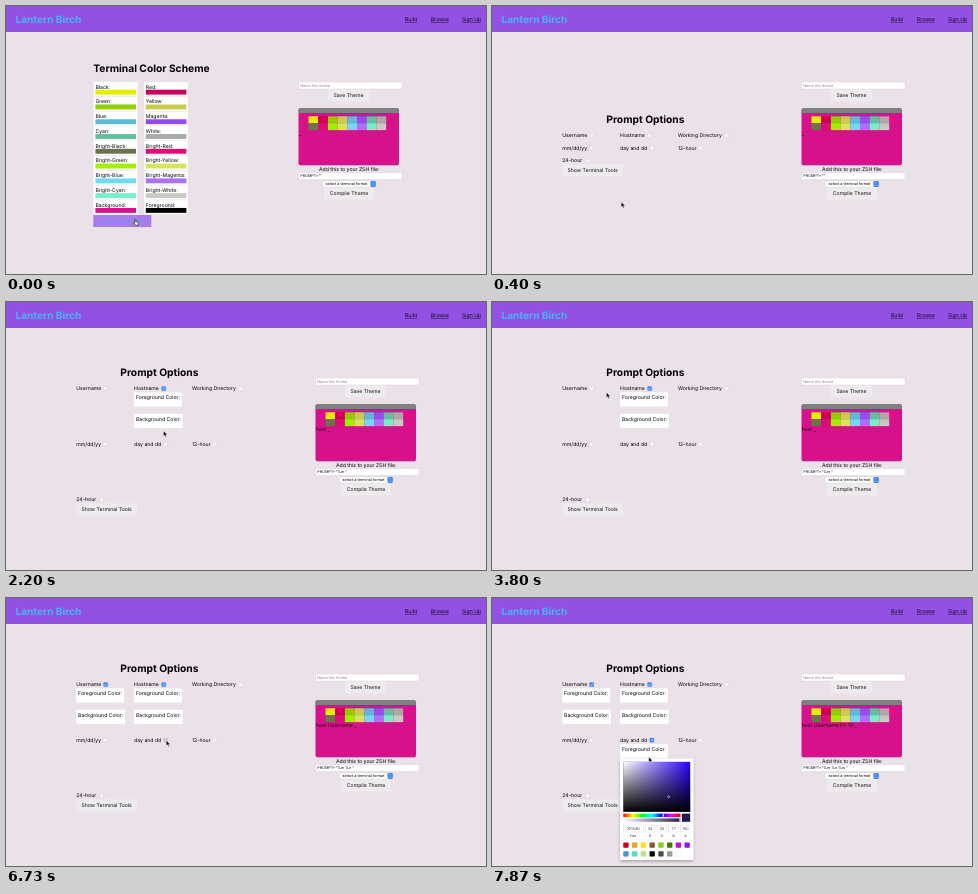
An HTML page for the animation above (8 s loop, 480x268 px).

```html
<!DOCTYPE html>
<html lang="en">
<head>
<meta charset="utf-8">
<title>Terminal theme builder</title>
<style>
html, body { margin: 0; width: 100%; height: 100%; overflow: hidden; background: #ebe1e9; }
svg { display: block; width: 100%; height: 100%; }
text { font-family: Inter, "Open Sans", sans-serif; white-space: pre; text-rendering: geometricPrecision; }
</style>
</head>
<body>
<svg viewBox="0 0 480 268">
  <defs>
    <linearGradient id="white"><stop stop-color="#fff"/><stop offset="1" stop-color="#fff" stop-opacity="0"/></linearGradient>
    <linearGradient id="black" x2="0" y2="1"><stop stop-opacity="0"/><stop offset="1"/></linearGradient>
    <linearGradient id="alpha"><stop stop-color="#22194d" stop-opacity="0"/><stop offset="1" stop-color="#22194d"/></linearGradient>
    <linearGradient id="hue">
      <stop stop-color="#f00"/><stop offset=".17" stop-color="#ff0"/><stop offset=".33" stop-color="#0f0"/>
      <stop offset=".5" stop-color="#0ff"/><stop offset=".67" stop-color="#00f"/><stop offset=".83" stop-color="#f0f"/>
      <stop offset="1" stop-color="#f00"/>
    </linearGradient>
    <filter id="shadow" x="-20%" y="-20%" width="140%" height="140%">
      <feDropShadow dx="0" dy="1.5" stdDeviation="1.8" flood-opacity=".28"/>
    </filter>
  </defs>
  <g id="page"></g>
  <g id="cursor">
    <path id="arrow" d="M0 0V5.2L1.2 4.1 2 6 2.9 5.6 2.1 3.8H3.7Z" fill="#000" stroke="#fff" stroke-width=".35"/>
    <path id="hand" d="M.9 .3Q1.5 -.1 1.8 .6V2.4L4.2 3.1V4.6L3.6 6.3H1.5L-.3 3.9Q0 3.2 .9 3.9Z" fill="#fff" stroke="#000" stroke-width=".55"/>
  </g>
</svg>
<script>
const LOOP = 8000, OPEN = 70, PICK = 7600, PRESS = 140;
const CLICKS = [2200, 5070, 6870];
const BODY = 5.15, SMALL = 3.75, TITLE = 10.25;
const $ = id => document.getElementById(id);

const NAMES = ['Black', 'Red', 'Green', 'Yellow', 'Blue', 'Magenta', 'Cyan', 'White'];
const COLORS = ['#e4f000', '#cb005c', '#8fce00', '#c9cb4e', '#5fb9d8', '#914cf2', '#62c0a2', '#a9a9a9',
  '#6f7052', '#dc0c74', '#a2f000', '#d6e65c', '#72d9f2', '#a873f8', '#74f0ca', '#c9cac4'];
const PINK = '#d6118a';
const PRESETS = ['#d0021b', '#f5a623', '#f8e71c', '#8b572a', '#7ed321', '#417505', '#bd10e0', '#9013fe',
  '#4a90e2', '#50e3c2', '#b8e986', '#000', '#4a4a4a', '#9b9b9b', '#fff'];

// cursor tip: time, x, y
const PATH = [[0, 128, 213], [70, 128, 213], [400, 129.3, 196], [870, 128, 160], [1670, 157.5, 129],
  [3130, 157.5, 129], [3800, 114.5, 90.5], [4000, 112, 90], [4270, 100, 86.7], [5330, 100, 86.7],
  [6130, 157.5, 144.5], [6400, 157.5, 144], [6730, 160.3, 142.5], [7130, 160.3, 142.5], [7400, 156.8, 159], [LOOP, 156.8, 159]];

const rect = (x, y, w, h, fill, more = '') =>
  `<rect x="${x}" y="${y}" width="${w}" height="${h}" fill="${fill}" ${more}/>`;

// text placed by the middle of its capitals
const text = (x, y, s, size = BODY, more = '') =>
  `<text x="${x}" y="${y + size * .36}" font-size="${size}" ${more}>${s}</text>`;
const mid = 'text-anchor="middle"';
const bold = 'font-weight="700"';

const button = (x, y, w, s, fill = '#eeebee', color = '#111') =>
  rect(x, y, w, 12, fill) + text(x + w / 2, y + 6, s, BODY, `${mid} fill="${color}"`);

const field = (x, y, s, color) =>
  rect(x, y, 103.5, 7, '#fff', 'stroke="#d5ccd4" stroke-width=".4"') + text(x + 1.8, y + 3.5, s, SMALL, `fill="${color}"`);

function header() {
  const links = [[399, 'Build'], [424.7, 'Browse'], [456, 'Sign Up']];
  return rect(0, 0, 480, 26, '#9351e3')
    + text(9.5, 13.3, 'Lantern Birch', 10.1, `${bold} fill="#49b2f5"`)
    + links.map(([x, s]) => text(x, 13, s, BODY, 'fill="#12081f" text-decoration="underline"')).join('');
}

function preview(dx, level) {
  const out = ['', 'host ', 'host Username ', 'host Username Fri 13 '][level];
  const code = ['', '%m ', '%m %n ', '%m %n %w '][level];
  const swatches = COLORS.map((c, i) =>
    rect(319.5 + i % 8 * 9.7, 110.3 + (i >> 3) * 6.9, 9.75, 6.95, c)).join('');
  return `<g transform="translate(${dx})">`
    + field(309.5, 76, 'Name this theme', '#8a858a')
    + button(339, 83.5, 41, 'Save Theme')
    + rect(309.5, 102, 100.5, 57.3, PINK, 'rx="2.6"')
    + '<path d="M309.5 107V104.6Q309.5 102 312.1 102H407.4Q410 102 410 104.6V107Z" fill="#808080"/>'
    + swatches
    + text(309.7, 127.3, out + '_', BODY, 'fill="#26041a"')
    + text(360.3, 162.8, 'Add this to your ZSH file:', BODY, mid)
    + field(309.5, 166.5, `PROMPT="${code}"`, '#111')
    + rect(333.2, 175, 53.6, 5.9, '#fff', 'rx="1.4" stroke="#cfc8cf" stroke-width=".3"')
    + text(357.5, 177.9, 'select a terminal format', SMALL, mid)
    + rect(381.5, 175, 5.3, 5.9, '#3a7ef3', 'rx="1.3"')
    + '<path d="M383 177.3l1.1 -1.2 1.1 1.2M383 178.6l1.1 1.2 1.1 -1.2" fill="none" stroke="#fff" stroke-width=".5"/>'
    + button(335, 181.5, 50, 'Compile Theme')
    + '</g>';
}

function themeScreen() {
  const labels = [...NAMES, ...NAMES.map(n => 'Bright-' + n), 'Background', 'Foreground'];
  const colors = [...COLORS, PINK, '#000'];
  const cards = labels.map((s, i) => {
    const x = 87.7 + i % 2 * 50.4, y = 76 + (i >> 1) * 14.78;
    return rect(x, y, 43.8, 14.1, '#fff') + text(x + 1.7, y + 4.7, s + ':')
      + rect(x + 1.7, y + 7.7, 40.6, 4.9, colors[i]);
  }).join('');
  return text(87.3, 62, 'Terminal Color Scheme', TITLE, bold) + cards
    + button(87.3, 209, 58, 'Show Prompt Tools', '#a77be9', '#6d9df0');
}

function checkbox(x, y, on, pressed) {
  const fill = on ? '#3d84ee' : pressed ? '#cfcacf' : '#f8f4f8';
  return rect(x - 2.1, y - 1.9, 4.2, 4.2, fill, `rx=".9" stroke="${on ? '#3d84ee' : '#c9c0c8'}" stroke-width=".35"`)
    + (on ? `<path d="M${x - 1} ${y + .2}l.8 .9 1.3 -1.9" fill="none" stroke="#fff" stroke-width=".6"/>` : '');
}

function promptScreen(level, pressed) {
  const options = [['Username', 99.7], ['Hostname', 157.7], ['Working Directory', 234.7],
    ['mm/dd/yy', 99.3], ['day and dd', 159.8], ['12-hour', 208.2], ['24-hour', 95.6]];
  const order = [1, 0, 4];
  const top = level ? 86.3 : 129.2, step = level ? 55.6 : 12.65;
  const rows = options.map(([s, cx], i) => {
    const x = 70.3 + i % 3 * 57.8, y = top + Math.floor(i / 3) * step;
    const turn = order.indexOf(i), on = turn >= 0 && turn < level;
    const boxes = on
      ? rect(x, y + 4, 47.7, 14.4, '#fff') + text(x + 1.8, y + 9, 'Foreground Color:')
        + rect(x, y + 25.5, 48.6, 14.4, '#fff') + text(x + 1.8, y + 30.6, 'Background Color:')
      : '';
    return text(x, y, s) + checkbox(cx, y, on, pressed && turn === level) + boxes;
  }).join('');
  return text(114.3, level ? 70 : 113, 'Prompt Options', TITLE, bold) + rows
    + button(70.3, level ? 201.3 : 158, 60.7, 'Show Terminal Tools');
}

function picker() {
  const inputs = [[131.3, 20, '22194D', 'Hex'], [153.2, 9.8, 34, 'R'], [165, 9.8, 25, 'G'], [176.8, 9.8, 77, 'B'], [188.6, 9.8, 100, 'A']];
  const knob = (x, y) => rect(x - .7, y, 1.4, 3, '#fff', 'rx=".3" stroke="#777" stroke-width=".2"');
  return rect(128, 160.7, 73.5, 101.3, '#fff', 'rx="1.3" filter="url(#shadow)"')
    + ['#2b00ff', 'url(#white)', 'url(#black)'].map(f => rect(131.3, 163.8, 66.9, 50, f)).join('')
    + '<circle cx="176.6" cy="198.7" r="1" fill="none" stroke="#fff" stroke-width=".5"/>'
    + rect(131.3, 215.6, 57.2, 3.4, 'url(#hue)') + knob(171.2, 215.8)
    + rect(131.3, 220.4, 57.2, 3.4, 'url(#alpha)') + knob(188, 220.6)
    + rect(190, 215.6, 8.2, 8.2, '#22194d')
    + inputs.map(([x, w, value, name]) =>
      rect(x, 227, w, 7, '#fff', 'stroke="#ccc" stroke-width=".35"')
      + text(x + w / 2, 230.5, value, 3.7, `${mid} fill="#333"`)
      + text(x + w / 2, 237.4, name, 3.5, `${mid} fill="#333"`)).join('')
    + rect(128, 240.9, 73.5, .35, '#eee')
    + PRESETS.map((c, i) => rect(131.3 + i % 8 * 8.75, 244.4 + (i >> 3) * 8.8, 5.3, 5.3, c,
      'rx=".9" stroke="#000" stroke-opacity=".15" stroke-width=".3"')).join('');
}

function moveCursor(t) {
  const i = PATH.findIndex(p => p[0] > t);
  const [t0, x0, y0] = PATH[i - 1], [t1, x1, y1] = PATH[i];
  const u = (t - t0) / (t1 - t0), e = u * u * (3 - 2 * u);
  $('cursor').setAttribute('transform', `translate(${x0 + (x1 - x0) * e} ${y0 + (y1 - y0) * e})`);
  $('hand').style.display = t < OPEN ? '' : 'none';
  $('arrow').style.display = t < OPEN ? 'none' : '';
}

let shown = '';
function draw(now) {
  const t = now % LOOP;
  const theme = t < OPEN, picking = t >= PICK;
  const level = CLICKS.filter(c => t >= c).length;
  const pressed = CLICKS.some(c => t < c && t >= c - PRESS);
  const key = [theme, level, pressed, picking].join();
  if (key !== shown) {
    shown = key;
    $('page').innerHTML = rect(0, 0, 480, 268, '#ebe1e9') + header() + preview(theme ? -17 : 0, level)
      + (theme ? themeScreen() : promptScreen(level, pressed)) + (picking ? picker() : '');
  }
  moveCursor(t);
}

let start;
function tick(now) {
  start ??= now;
  draw(now - start);
  requestAnimationFrame(tick);
}
draw(0);
requestAnimationFrame(tick);
</script>
</body>
</html>
```
